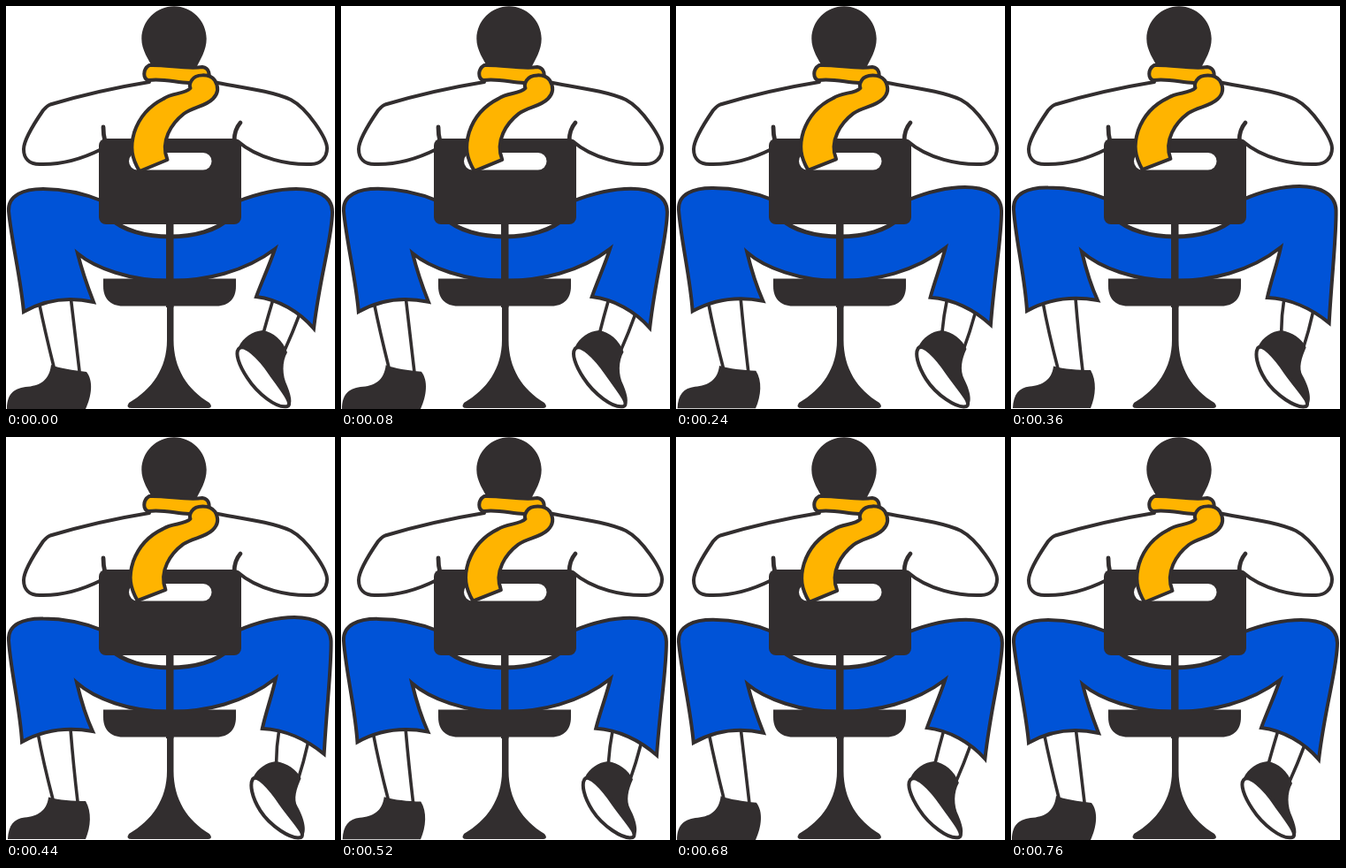
An HTML page that plays this animation: 372 px wide and 456 px high, repeating every 1.96 s.

```html
<!DOCTYPE html>
<html lang="en">
<head>
<meta charset="utf-8">
<title>Seated figure tapping a foot</title>
<style>
  html, body { margin: 0; width: 100%; height: 100%; overflow: hidden; background: #fff; }
  svg { display: block; width: 372px; height: 456px; }
  .line { fill: none; stroke: #322e2f; stroke-width: 4; stroke-linecap: round; }
  .thin { stroke-width: 3.6; }
  .thick { stroke-width: 4.8; }
  .dark { fill: #322e2f; }
  .white { fill: #fff; }
  .blue { fill: #0053d7; }
  .yellow { fill: #ffb400; stroke-linejoin: round; }
</style>
</head>
<body>
<svg viewBox="0 0 372 456">
  <!-- arms and back -->
  <path class="line" d="M162 86C125 92 85 101 50 111.500Q46 113 42 118C31 134 20 152 20 162C20 172 26 179 38 179C65 180 88 172 108 162"/>
  <path class="line" d="M234 86C265 92 300 96 322 106C341 116 363 150 363 161C363 172 355 179 345 179C320 180 285 173 262 153"/>
  <path class="line thick" d="M110 137Q110 146 112 153M265 132Q258 140 258 153"/>

  <!-- legs -->
  <path class="line thin" id="shins"/>
  <path class="line blue" id="pants"/>
  <path class="line thick white" d="M118 240C145 268 226 268 252 240"/>
  <path class="dark" id="leftShoe"/>
  <path class="dark" id="rightShoe"/>
  <path class="line white" id="sole"/>

  <!-- chair -->
  <rect class="dark" x="105" y="150" width="161" height="97" rx="8"/>
  <rect class="white" x="139" y="166" width="93.500" height="19.500" rx="9.750"/>
  <rect class="dark" x="181" y="246" width="8.500" height="95"/>
  <path class="dark" d="M110 308.500H260V317C260 331 252 339.500 238 339.500H132C118 339.500 110 331 110 317Z"/>
  <path class="dark" d="M182 338V378C182 410 165 434 139 449Q135 455 142 455H227Q235 455 230 449C205 434 189.500 410 189.500 378V338Z"/>

  <!-- head and scarf -->
  <path class="dark" d="M153.300 37C153.300 17 170 0.300 190 0.300S226.700 17 226.700 37C226.700 50 220 60 214 72H167C161 60 153.300 50 153.300 37Z"/>
  <path class="line yellow" d="M162 67C180 66 205 72 222 69C230 70 231 78 228 83C224 88 213 88 207 87C190 86 178 82 161 84C155 82 154 72 162 67Z"/>
  <path class="line yellow" id="tail" d="M210 84C214 77 230 76 236 84C241 92 240 99 234 105C225 114 212 114 201 122C187 133 174 153 182.500 174L151 187C142 172 140 160 145 143C150 128 160 114 178 105C188 98 202 100 208.500 93C207 90 208 87 210 84Z"/>
</svg>
<script>
const LOOP = 1960, STEP = 40, PEAK = 400, END = 760;

// Each moving outline: resting pose, then lifted pose.
const poses = {
  shins: [
    "M37.5 336Q44 368 54 408M73.5 332Q78 370 83 413M302 332Q296 352 291 370M333 346Q324 370 314 392",
    "M36 335Q42 368 53 410M73 331Q76 370 81 413M309 331Q306 350 306 370M342 345Q337 368 330 390"
  ],
  pants: [
    "M110 221C88 212 65 207 42 207C20 207 2 214 3 232C6 265 17 310 20 346C45 332 72 329 99 335C92 317 86 300 81 280C100 296 140 311 185 311C225 311 270 301 304 275C298 293 290 310 283 329C308 332 332 346 348 365C355 305 369 262 369 233C369 214 350 207 328 207C308 207 288 211 262 221Z",
    "M110 219C88 210 65 205.5 42 205.5C20 205 2 212 3 230C5 263 16 308 18 345C43 331 70 328 98 333C90 316 85 299 80 278C100 296 140 311 185 311C225 311 270 301 305 273C301 292 294 311 290 330C315 331 340 342 360 358.5C363 303 368 260 367.5 231C367 212 348 204 326 204C308 204 288 208 262 219Z"
  ],
  leftShoe: [
    "M1 456C1 440 8 433 22 431C38 430 49 424 51 406C60 410 76 412 91 414C99 424 97 441 90 456Z",
    "M2 455C3 439 9 432 21 430.5C36 429 46 423 48 407.5C60 411 76 412 90 412C97 424 96 441 90 455Z"
  ],
  rightShoe: [
    "M263 386C268 375 279 368 290 367C302 369 313 378 318 392C312 402 312 418 318 430C324 445 324 453 317 454Z",
    "M280 385C285 375 295 368 306 367C318 369 329 376 334 386C329 398 325 409 330 418C337 430 342 447 335 453Z"
  ],
  sole: [
    "M263 388C269 381 286 397 299 416C313 436 325 450 318 453C306 456 284 438 273 421C263 406 259 393 263 388Z",
    "M279.5 387C284 381 298 396 311 415C326 436 340 449 334 453C323 456 299 440 288 423C278 407 276 393 279.5 387Z"
  ]
};

const byId = id => document.getElementById(id);
const wave = x => (1 - Math.cos(Math.PI * x)) / 2;

function blend([rest, lifted], k) {
  const goal = lifted.match(/[\d.]+/g);
  let i = 0;
  return rest.replace(/[\d.]+/g, n => (+n + (goal[i++] - n) * k).toFixed(2));
}

function liftAt(t) {
  if (t >= END) return 0;
  return t < PEAK ? wave(t / PEAK) : wave((END - t) / (END - PEAK));
}

function draw(now) {
  const t = Math.floor((now % LOOP) / STEP) * STEP;
  const k = liftAt(t);
  for (const id in poses) byId(id).setAttribute("d", blend(poses[id], k));
  byId("tail").setAttribute("transform", `rotate(${1.5 * k} 222 92)`);
}

const start = performance.now();
function tick() {
  draw(performance.now() - start);
  requestAnimationFrame(tick);
}
tick();
</script>
</body>
</html>
```
